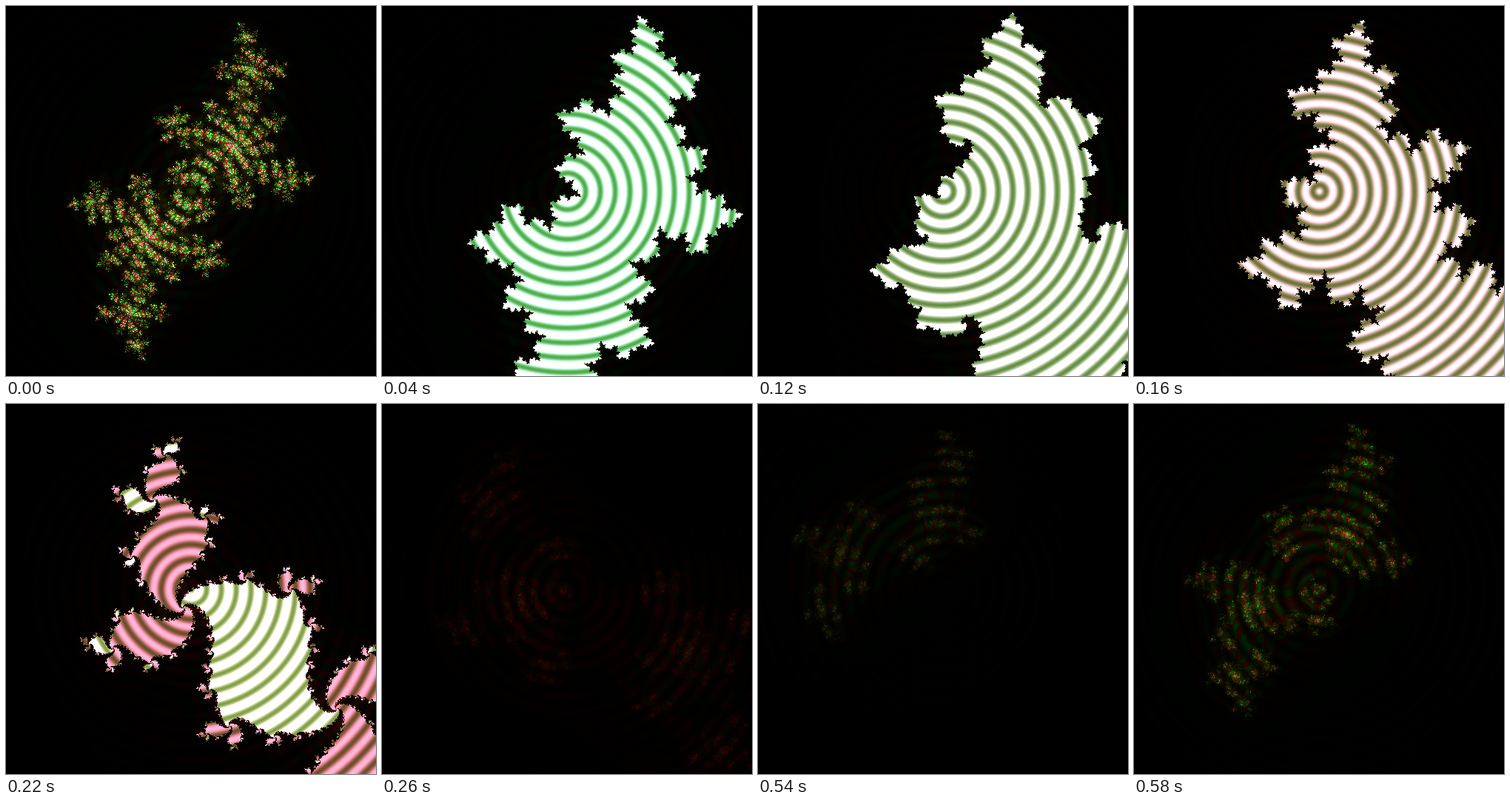
These frames come from a looping animation (500x500 px, 600 ms). An HTML page with a canvas:

```html
<!DOCTYPE html>
<html>
<head>
<meta charset="utf-8">
<style>
html, body { margin: 0; width: 100%; height: 100%; overflow: hidden; background: #000; }
canvas { display: block; width: 500px; height: 500px; }
</style>
</head>
<body>
<canvas id="stage" width="500" height="500"></canvas>
<script>
const SIZE = 500, STEPS = 30, STEP_MS = 20, MAX_ITER = 150;
const ctx = document.getElementById('stage').getContext('2d');
const clamp = (v, a, b) => Math.min(b, Math.max(a, v));
const mix = (a, b, m) => a + (b - a) * m;

// Stripe colour at the dark line, and how much it gains at the bright one.
const GREEN = { low: [82, 170, 75], gain: [260, 200, 330] };
const OLIVE = { low: [132, 168, 74], gain: [260, 200, 330] };
const PINK = { low: [110, 77, 42], gain: [205, 108, 185] };

// Phase of the concentric rings around the middle of the stage.
const ringPhase = new Float32Array(SIZE * SIZE);
for (let y = 0, p = 0; y < SIZE; y++) {
  for (let x = 0; x < SIZE; x++, p++) {
    ringPhase[p] = Math.hypot(x - SIZE / 2, y - SIZE / 2) * Math.PI / 10;
  }
}

// Colours of points that escape, by iteration count.
function dustPalette(angle) {
  const greenness = 0.6 + 0.4 * Math.cos(angle);
  return Array.from({ length: MAX_ITER }, (_, i) => {
    const v = Math.pow(i, 1.3);
    const w = Math.cos(i * 1.9);
    return [
      v * (0.5 + 0.5 * w),
      v * (0.5 - 0.5 * w) * greenness,
      v * (0.2 + 0.2 * Math.sin(i * 2.7)) * Math.min(1, i / 120) * greenness
    ];
  });
}

function render(step) {
  const angle = step / STEPS * 2 * Math.PI;
  const zoom = 1 + 0.5 * Math.sin(angle);
  const unit = 3 / (SIZE * zoom);
  const cr = -0.7 * Math.cos(angle - 1), ci = 0.75 * Math.sin(angle - 1);
  const palette = dustPalette(angle);
  const pinkness = clamp((step - 4) / 7, 0, 1);
  const img = ctx.createImageData(SIZE, SIZE);
  const out = img.data;

  for (let y = 0, p = 0; y < SIZE; y++) {
    for (let x = 0; x < SIZE; x++, p++) {
      // The real axis points up, the imaginary axis to the right.
      let a = 1.5 - y * unit, b = x * unit - 1.5;
      let a2 = a * a, b2 = b * b, i = 0;
      while (i < MAX_ITER && a2 + b2 < 4) {
        b = 2 * a * b + ci;
        a = a2 - b2 + cr;
        a2 = a * a;
        b2 = b * b;
        i++;
      }
      const o = p * 4;
      const q = 0.5 + 0.5 * Math.cos(ringPhase[p] + 4 * angle);
      if (i < MAX_ITER) {
        const col = palette[i], f = 0.25 + 0.75 * q;
        for (let k = 0; k < 3; k++) out[o + k] = col[k] * f;
      } else {
        const m = step > 9 && a2 + b2 < 0.16 ? 0.1 : pinkness;
        for (let k = 0; k < 3; k++) {
          const base = mix(GREEN.low[k], OLIVE.low[k], pinkness);
          out[o + k] = mix(base, PINK.low[k], m) +
            q * mix(GREEN.gain[k], PINK.gain[k], m);
        }
      }
      out[o + 3] = 255;
    }
  }
  return img;
}

const poses = Array.from({ length: STEPS }, (_, i) => render(i));
const start = performance.now();
let shown = -1;

function draw() {
  const t = Math.max(0, performance.now() - start);
  const step = Math.floor(t / STEP_MS) % STEPS;
  if (step !== shown) {
    ctx.putImageData(poses[step], 0, 0);
    shown = step;
  }
  requestAnimationFrame(draw);
}
draw();
</script>
</body>
</html>
```
